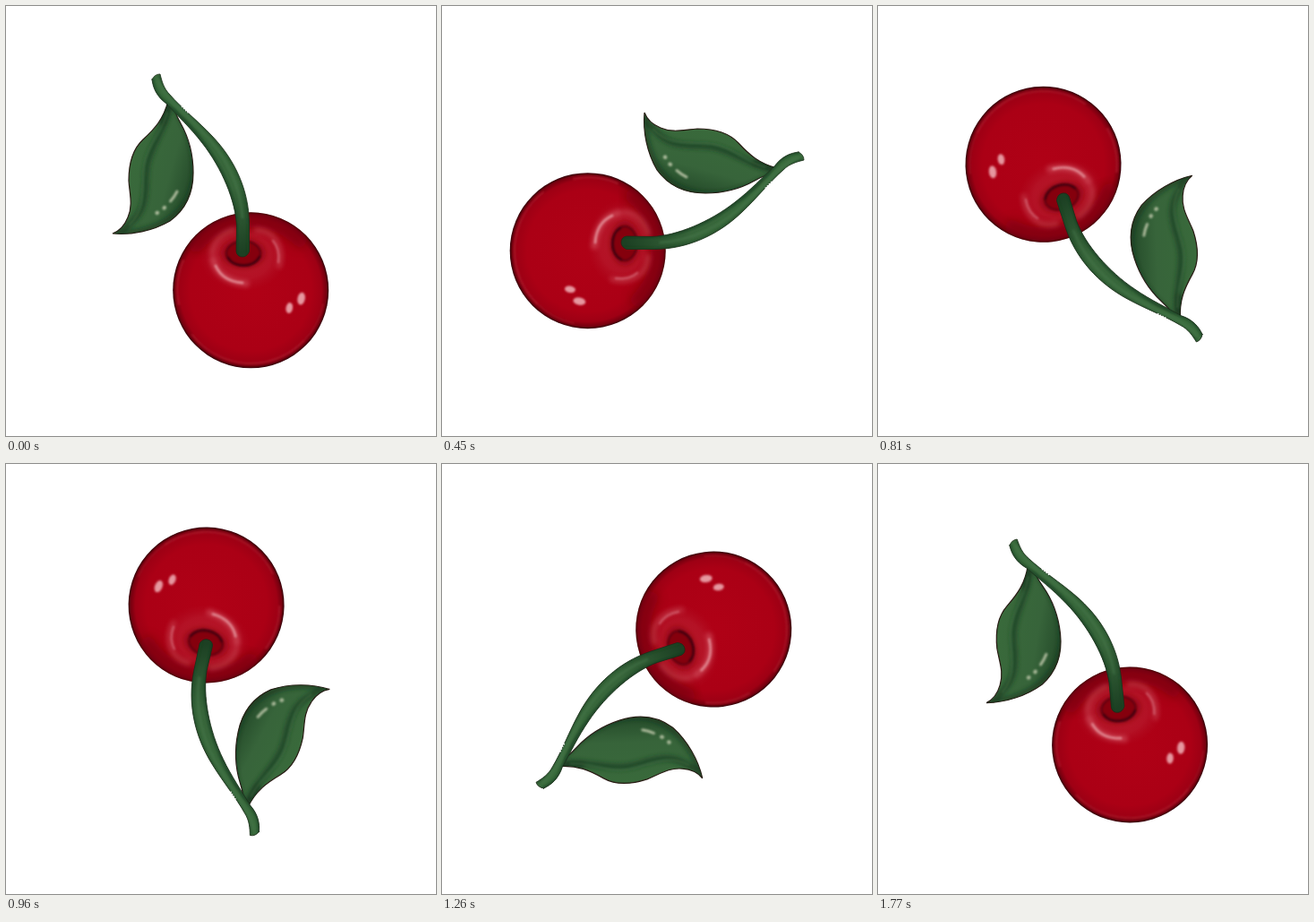
Recreate the animation shown at these times as an HTML page. Size 480 by 480 pixels, loop 1800 ms.

```html
<!DOCTYPE html>
<html lang="en">
<head>
<meta charset="utf-8">
<title>Spinning cherry</title>
<style>
html, body { margin: 0; width: 100%; height: 100%; overflow: hidden; background: #fff; }
svg { display: block; width: 100%; height: 100%; }
</style>
</head>
<body>
<svg viewBox="0 0 480 480">
  <defs>
    <radialGradient id="skin" gradientUnits="userSpaceOnUse" cx="273.2" cy="317.3" r="87">
      <stop offset="0" stop-color="#b00116"/>
      <stop offset=".78" stop-color="#ab0015"/>
      <stop offset=".91" stop-color="#9e0014"/>
      <stop offset=".97" stop-color="#76000f"/>
      <stop offset="1" stop-color="#300008"/>
    </radialGradient>
    <radialGradient id="glow">
      <stop offset="0" stop-color="#ba2434"/>
      <stop offset=".65" stop-color="#b81f31" stop-opacity=".8"/>
      <stop offset="1" stop-color="#b01226" stop-opacity="0"/>
    </radialGradient>
    <linearGradient id="stemFill" gradientUnits="userSpaceOnUse" x1="190" y1="80" x2="255" y2="278">
      <stop offset="0" stop-color="#3a6b3d"/>
      <stop offset=".65" stop-color="#37653a"/>
      <stop offset=".85" stop-color="#29522e"/>
      <stop offset="1" stop-color="#1c4023"/>
    </linearGradient>
    <linearGradient id="leafFill" gradientUnits="userSpaceOnUse" x1="138" y1="170" x2="209" y2="190">
      <stop offset="0" stop-color="#396a3b"/>
      <stop offset=".65" stop-color="#37643a"/>
      <stop offset="1" stop-color="#264d2b"/>
    </linearGradient>
    <filter id="soft1" x="-50%" y="-50%" width="200%" height="200%"><feGaussianBlur stdDeviation="1.2"/></filter>
    <filter id="soft2" x="-50%" y="-50%" width="200%" height="200%"><feGaussianBlur stdDeviation="2.4"/></filter>
    <filter id="soft3" x="-50%" y="-50%" width="200%" height="200%"><feGaussianBlur stdDeviation="6"/></filter>
    <circle id="fruit" cx="273.2" cy="317.3" r="87"/>
    <path id="leaf" d="M181 106C176 126 166 137 153 149C140 161 137 178 137 195C138 210 142 222 136 236C132 246 127 251 119 254C140 256 164 251 183 240C201 227 209 209 209 186C209 167 204 147 195 131C190 122 187 115 186 108Z"/>
    <path id="stem" d="M163 82Q166 76 172 76C174 84 176 92 183 99C196 114 215 129 230 145C256 172 271 206 271.5 242L271.5 274Q269 280 264 280Q258 280 257 274L257.5 246C256.5 218 241 181 219 153C206 136 191 122 179 109C168 101 164 91 163 82Z"/>
    <clipPath id="fruitClip"><use href="#fruit"/></clipPath>
    <clipPath id="leafClip"><use href="#leaf"/></clipPath>
    <clipPath id="stemClip"><use href="#stem"/></clipPath>
  </defs>

  <g id="cherry" fill="none" stroke-linecap="round">
    <use href="#fruit" fill="url(#skin)"/>
    <g clip-path="url(#fruitClip)">
      <g filter="url(#soft1)">
        <path d="M193 333A82 82 0 0 1 198 284M208 367A82 82 0 0 0 332 374" stroke="#d02a3e" stroke-width="2" opacity=".5"/>
        <path d="M332 374A82 82 0 0 0 354 333" stroke="#d02a3e" stroke-width="2" opacity=".3"/>
      </g>
      <ellipse cx="265" cy="279" rx="49" ry="39" fill="url(#glow)" opacity=".7"/>
      <path d="M212 268A78 78 0 0 1 328 262" stroke="#780010" stroke-width="15" opacity=".75" filter="url(#soft3)"/>
      <g filter="url(#soft2)">
        <path d="M230 276C231 262 243 253 254 250M280 250C301 251 310 270 305 290" stroke="#cf5662" stroke-width="6" opacity=".42"/>
        <path d="M231 283C234 297 246 308 268 310" stroke="#db6674" stroke-width="7" opacity=".5"/>
        <ellipse cx="265" cy="276" rx="25" ry="17" fill="#8c0012" opacity=".65"/>
      </g>
      <g filter="url(#soft1)">
        <path d="M234 290C239 301 249 308 264 309" stroke="#eca6ad" stroke-width="3" opacity=".7"/>
        <path d="M298 262Q306 271 304 286" stroke="#e0848f" stroke-width="2.5" opacity=".55"/>
        <ellipse cx="265" cy="276" rx="19" ry="13.5" fill="#85000e" stroke="#58000a" stroke-width="2"/>
        <path d="M248 281C254 292 276 293 283 280" stroke="#400008" stroke-width="3"/>
        <g fill="#f0b2b8" opacity=".85">
          <ellipse cx="316.3" cy="337" rx="3.8" ry="6" transform="rotate(10 316 337)"/>
          <ellipse cx="329.7" cy="326.5" rx="4.2" ry="7" transform="rotate(10 329 326)"/>
        </g>
      </g>
    </g>

    <use href="#leaf" fill="url(#leafFill)" stroke="#291b14" stroke-width="1.2"/>
    <g clip-path="url(#leafClip)">
      <g filter="url(#soft2)">
        <path d="M183 108C179 137 160 157 157 181C154 211 162 228 127 252" stroke="#173a1f" stroke-width="6" opacity=".75"/>
        <path d="M189 113C207 143 216 174 207 204C197 237 161 254 120 254" stroke="#16331c" stroke-width="5" opacity=".65"/>
        <path d="M182 106L175 130" stroke="#16321c" stroke-width="8" opacity=".7"/>
      </g>
      <path d="M180 119C174 142 157 156 154 178C151 208 157 224 138 244" stroke="#457748" stroke-width="2" opacity=".5" filter="url(#soft1)"/>
      <g stroke="#c9d0b4" filter="url(#soft1)" opacity=".8">
        <path d="M183.5 218Q188 213 191 207" stroke-width="3"/>
        <path d="M176.5 225.5L177 225M168.5 231L169 230.8" stroke-width="4.2"/>
      </g>
    </g>

    <use href="#stem" fill="url(#stemFill)" stroke="#1d2c19" stroke-width=".8"/>
    <g clip-path="url(#stemClip)">
      <g filter="url(#soft1)">
        <path d="M163 82C165 101 177 107 188 117C216 142 256 195 257 246L257 278" stroke="#183b20" stroke-width="4" opacity=".65"/>
        <path d="M172 78C177 99 205 117 230 145C258 174 271 207 271 244L271 278" stroke="#1c4224" stroke-width="3" opacity=".65"/>
        <path d="M170 83C174 99 194 113 217 138C247 168 262 203 264 236" stroke="#48794b" stroke-width="3" opacity=".5"/>
      </g>
    </g>
    <path d="M196 112L204 120" stroke="#fff" stroke-width="1.2" stroke-linecap="butt" stroke-dasharray="1.5 1.5"/>
  </g>
</svg>
<script>
const LOOP = 1800, STEP = 30;
const cherry = document.getElementById("cherry");
const start = performance.now();

function render(time) {
  const step = Math.floor((time % LOOP) / STEP);
  cherry.setAttribute("transform", `rotate(${step * 360 * STEP / LOOP} 240 240)`);
}

function tick() {
  render(performance.now() - start);
  requestAnimationFrame(tick);
}
tick();
</script>
</body>
</html>
```
